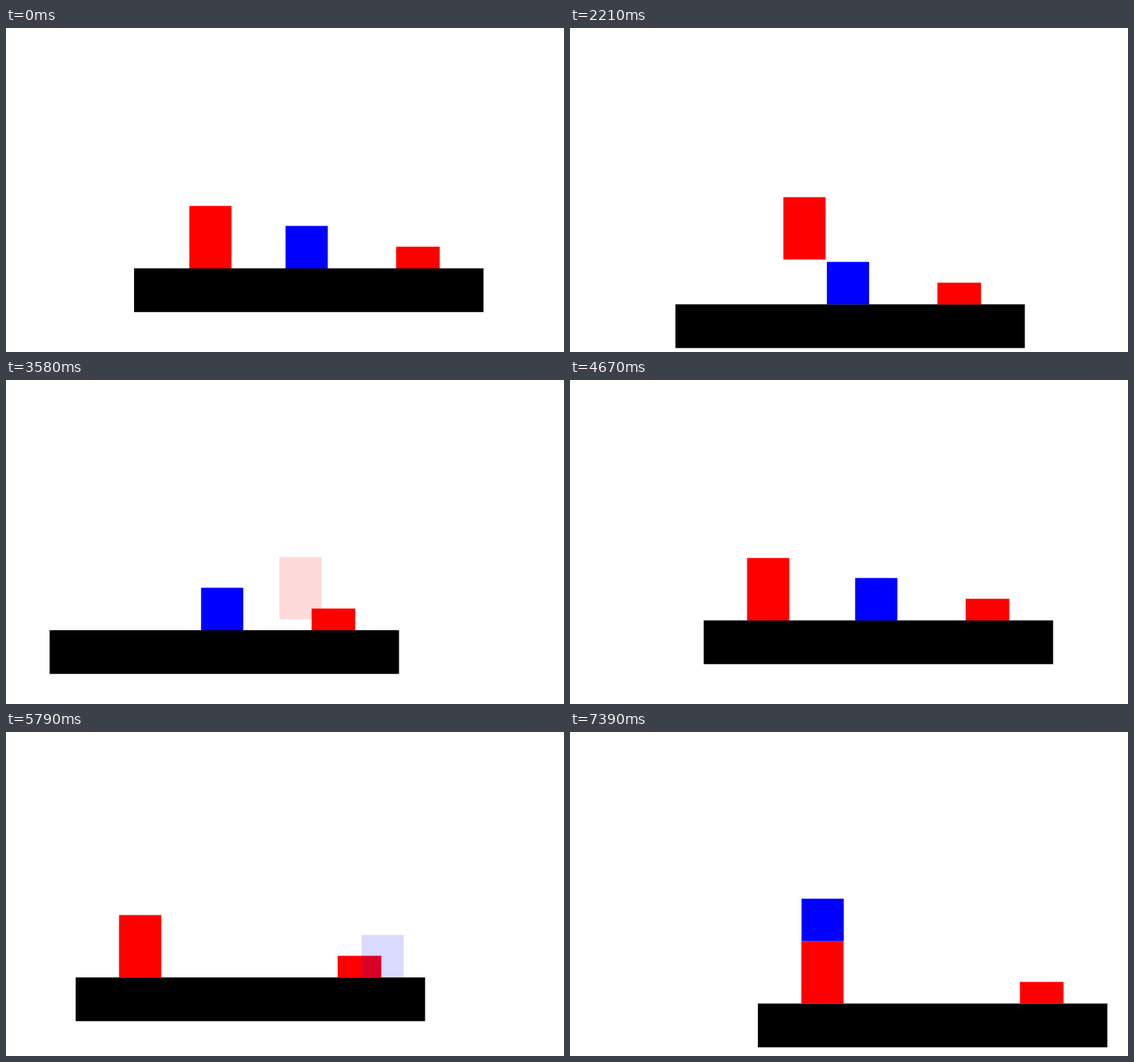
Recreate the animation shown at these times as an HTML page. Size 793 px wide and 461 px high, loop 7.42 s.

```html
<!DOCTYPE html>
<html lang="en">
<head>
<meta charset="utf-8">
<title>Two blocks</title>
<style>
html, body { margin: 0; width: 100%; height: 100%; overflow: hidden; background: #fff; }
svg { display: block; width: 100%; height: 100%; }
</style>
</head>
<body>
<svg viewBox="0 0 793 461">
  <rect id="floor" width="496.6" height="62.2"/>
  <rect id="hazard" width="62" height="30.8" fill="#f00"/>
  <rect id="red" width="60" height="88.8" fill="#f00"/>
  <rect id="blue" width="60" height="60.4" fill="#00f"/>
</svg>
<script>
const LOOP = 7420;
const JUMP = 760, GRAVITY = 2100;   // px/s, px/s²
const LAG = 160;                    // camera time constant, ms
const DEATH = 440, FADE = 305;      // hit to respawn, and fade time, ms
const HOME = { x: 182, y: 342 };
const [floor, hazard, red, blue] =
  ['floor', 'hazard', 'red', 'blue'].map(id => document.getElementById(id));

const progress = (t, from, to) => Math.min(1, Math.max(0, (t - from) / (to - from)));

// Height of a body thrown at `start` from height `h`, coming to rest at `rest`.
function hop(t, start, h, rest, speed = JUMP) {
  const s = (t - start) / 1000;
  const y = h + speed * s - GRAVITY * s * s / 2;
  return s * GRAVITY > speed ? Math.max(rest, y) : y;
}

// Positions are relative to the floor's top left corner; h is the height above it.
const redGuy = {
  x0: 78.5, spawn: 3760,
  x(t) {
    if (t >= this.spawn) return 61.7;
    return this.x0 + 42.5 * progress(t, 1315, 1700) ** 1.5
      + 65.4 * progress(t, 1700, 2730) + 140 * progress(t, 2730, 3335);
  },
  h(t) {
    if (t >= this.spawn) return hop(t, this.spawn, 34, 0, 0);
    if (t >= 2490) return hop(t, 2490, 61, 15.5);
    return t < 1584 ? 0 : hop(t, 1584, 0, 61);
  }
};

const blueGuy = {
  x0: 215.3, spawn: 5970,
  x(t) {
    return t >= this.spawn ? 62 : this.x0 + 191 * progress(t, 4945, 5488);
  },
  h(t) {
    if (t >= this.spawn) return 88.8;
    if (t >= 4733) return hop(t, 4733, 40.5, 0);
    return t < 4675 ? 0 : hop(t, 4675, 0, 0);
  }
};

// The camera trails the midpoint of both players; one state per millisecond.
const players = [redGuy, blueGuy];
const follow = 1 - Math.exp(-1 / LAG);
const camera = [];
for (let t = 0, { x, y } = HOME; t < LOOP; t++) {
  const goal = { ...HOME };
  for (const p of players) {
    goal.x -= (p.x(t) - p.x0) / 2;
    goal.y += p.h(t) / 2;
  }
  x += (goal.x - x) * follow;
  y += (goal.y - y) * follow;
  camera.push({ x, y });
}

function place(el, x, y) {
  el.setAttribute('x', x.toFixed(2));
  el.setAttribute('y', y.toFixed(2));
}

function placePlayer(el, p, cam, t) {
  place(el, cam.x + p.x(t), cam.y - p.h(t) - el.height.baseVal.value);
  const hit = p.spawn - DEATH;
  el.setAttribute('opacity', t < p.spawn ? 1 - progress(t, hit, hit + FADE) : 1);
}

function draw(t) {
  const cam = camera[Math.floor(t)];
  place(floor, cam.x, cam.y);
  place(hazard, cam.x + 372.4, cam.y - 30.8);
  placePlayer(red, redGuy, cam, t);
  placePlayer(blue, blueGuy, cam, t);
}

const start = performance.now();
function tick() {
  draw((performance.now() - start) % LOOP);
  requestAnimationFrame(tick);
}
tick();
</script>
</body>
</html>
```
